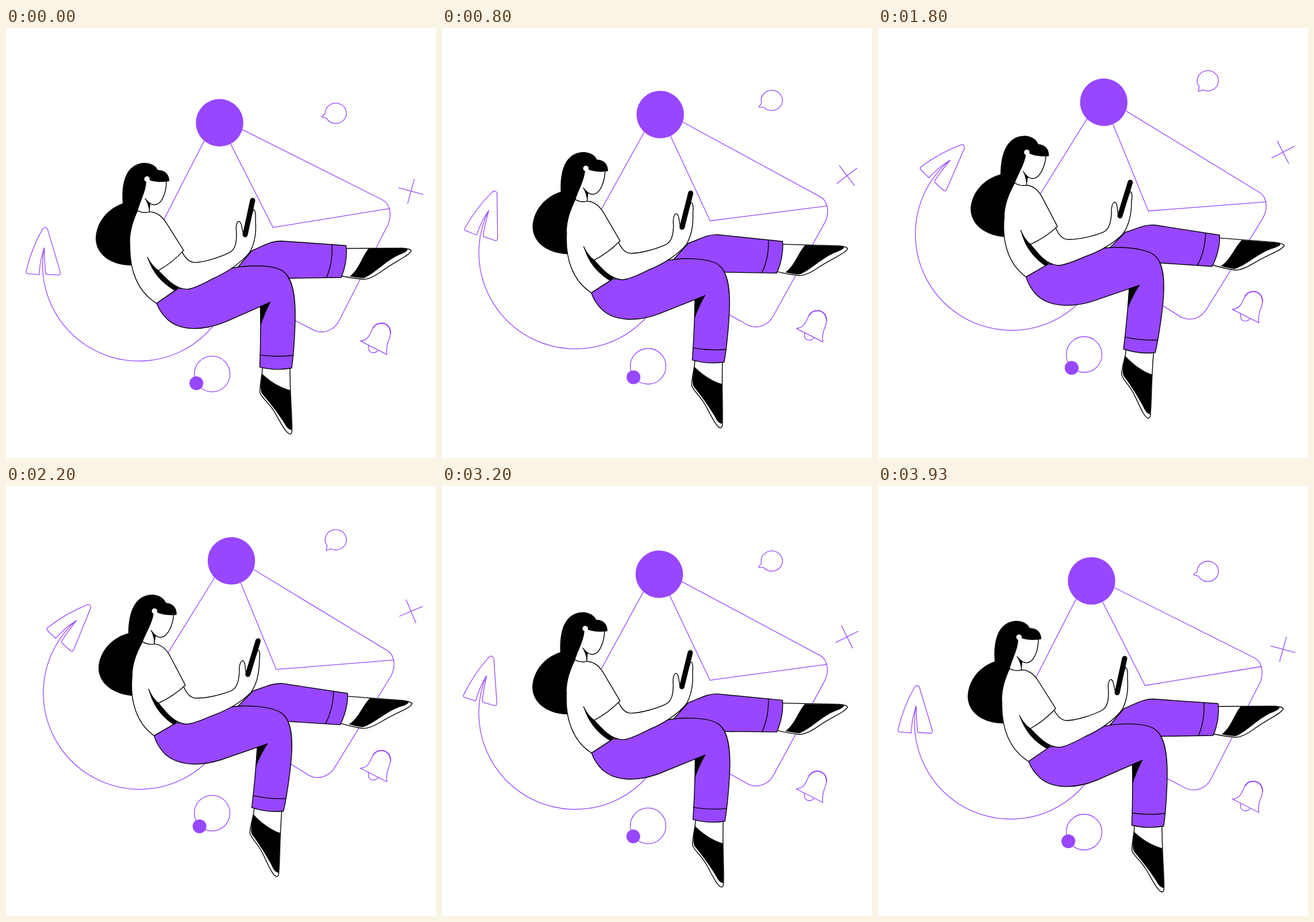
An HTML page that plays this animation: 748 px wide and 748 px high, repeating every 3.99 s.

```html
<!DOCTYPE html>
<html lang="en">
<head>
<meta charset="utf-8">
<title>Floating messenger</title>
<style>
  html, body { margin: 0; width: 100%; height: 100%; overflow: hidden; background: #fff; }
  svg { display: block; width: 100vw; height: 100vh; }
  .line { fill: none; stroke: #9747ff; stroke-width: 1.3; stroke-linejoin: round; }
  .purple { fill: #9747ff; }
  .ink { fill: none; stroke: #000; stroke-width: 1.4; stroke-linejoin: round; stroke-linecap: round; }
  .white { fill: #fff; }
  .pants { fill: #9747ff; }
</style>
</head>
<body>
<svg viewBox="0 0 748 748">
  <g class="line">
    <path id="trail"/>
    <path id="plane" d="M63.500 350Q67.500 344.500 72 350L94.500 425Q95.500 430 91 430L72 429Q69 429 68.700 426Q66.500 405 66.500 383Q59 402 57.800 429.500L38 427.800Q34 427 35 423.500C41 398 51 372 63.500 350Z"/>
    <path id="bubble"/>
    <path id="plus" d="M-22.300 0H22.300M0-22.300V22.300"/>
    <g id="bell">
      <path d="M616.500 544.500C632 543 633 531 639 521C645 512 658 511 665 519C672 529 668 538 664 548Q661 558 662.500 568Z"/>
      <path d="M638 522C645 512 658 511 665 519Q669 524 669 532" stroke-width="2"/>
      <path d="M631 552C629 560 633 565 639 565Q645 565 647.500 560"/>
    </g>
    <g id="orbit">
      <circle r="31"/>
      <circle id="moon" class="purple" r="12" stroke="none"/>
    </g>
  </g>

  <g id="scene">
    <g id="envelope">
      <path class="line" d="M371.500 144L262 358M371.500 164L464.500 347L668 314M371.500 157L655 299C668 306 672 325 664 343L580 508C572 525 554 533 537 526.500L480 497"/>
      <circle class="purple" cx="371.500" cy="165" r="41.300"/>
    </g>

    <g id="far-leg">
      <path class="ink white" d="M590 383.500L690 383Q703 384 705 387C702 396 680 404 655 422Q635 437 622 437Q605 436 582 431"/>
      <path d="M630.500 384L697 383.500Q702 387 688 393C662 403 645 425 623 435Q612 435 598 432C614 420 619 398 630.500 384Z"/>
      <path class="ink pants" d="M400 420L428 387C445 381 459 370.500 478 370.500L591.500 378.500C594 396 590 418 583 434L490 435.500Z"/>
      <path class="ink" d="M567 377C568 398 565 417 557.500 434"/>
    </g>

    <g id="near-leg">
      <path class="ink white" d="M446 590Q446 600 444 610Q441 630 442 635C446 645 457 651 467 668C477 685 486 703 493 706Q498 708 497.500 696C497.500 670 494 640 494 590"/>
      <path d="M445 601C458 613 475 625 494.500 630C495 655 497.500 680 497 699C490 699 487 692 482 684C470 666 456 648 446 637Q441 632 445 601Z"/>
      <path class="ink pants" d="M262 479L298 454L312 452L385 420C412 412 461 411 480 422C500 434 504 470 503 510C502 545 500 570 497 591.500Q470 597 441.500 590Q443.500 540 442.500 485L460 477L380 512C340 528 303 526 282 508Q268 495 262 479Z"/>
      <path d="M442.500 485L460 477Q450 496 443 518Z"/>
      <path class="ink" d="M442.500 569Q470 573 499 569.500"/>
    </g>

    <g id="body">
      <path d="M203 305C170 317 156 345 156 367C157 396 185 413 218 413L240 320Z"/>
      <path class="white" d="M229 318Q239 323 250 320C264 320 274 331 280 341L309 387L300 453L262 479C230 460 214 422 215.500 375C215.500 350 222 335 229 318Z"/>
      <path class="ink" d="M215.500 375C214 422 230 460 262 479L298 454"/>
      <path class="ink white" d="M306 389Q315 407 327 408C345 408 375 398 390 390C400 384 401 370 401 358C400 350 400 340 404 337Q408 335 410 345Q412 358 415 363L430 316Q435 316 434 335C436 360 432 376 424 390C410 408 385 425 360 436C340 447 325 454 315 454.500C295 454 280 438 265 422"/>
      <path d="M246 399Q254 415 264 421.500C275 430 285 444 301 452L293.500 457C274 446 255 428 246 399Z"/>
      <path class="ink white" d="M250 320C264 320 274 331 280 341L309 387Q290 408 265 422Q254 415 246 399"/>
      <path d="M429 300L416 359.500" stroke="#000" stroke-width="9" stroke-linecap="round"/>
    </g>

    <g id="head">
      <path class="white" d="M244 262L279 264C279 285 272 303 263 307L251 306L250 320Q239 323 229 318Z"/>
      <path class="ink" d="M279 266C279 285 272 303 263 306.500Q253 311 242 297M249.500 304V320Q239 323 229 318"/>
      <path d="M241.500 296L251 306Q250 313 249.500 319Q248 308 241.500 296Z"/>
      <path d="M203 306C200 270 208 236 241 234.500C254 235 261 241 264 247C278 247 284 256 284 266.500C270 269 255 268 246 263L244 268C243 285 234 300 229 318C222 335 215.500 350 215.500 376L203 340Z"/>
      <circle class="white" cx="245.300" cy="263" r="4.800"/>
    </g>
  </g>
</svg>
<script>
const LOOP = 3990;
const STEP = 4000 / 60;
const HALF = 2000;
const LEAD = 55;

const el = id => document.getElementById(id);
const set = (id, name, value) => el(id).setAttribute(name, value);
const polar = (cx, cy, rx, ry, deg) => {
  const a = deg * Math.PI / 180;
  return `${cx + rx * Math.cos(a)} ${cy + ry * Math.sin(a)}`;
};

// Eased rise and fall: 0 at the ends of the loop, 1 in the middle.
function lift(ms) {
  const step = Math.floor((ms + 4) / STEP);
  const t = (step * STEP + LEAD) % (2 * HALF);
  const s = 1 - Math.abs(t - HALF) / HALF;
  return s * s * (3 - 2 * s);
}

function drawTrail(p) {
  const cx = 231 + 1.5 * p, cy = 412 - 54.4 * p, turn = 40.6 * p;
  const start = polar(cx, cy, 167.5, 167.5, 25);
  const end = polar(cx, cy, 167.5, 167.5, 190 + turn);
  const large = 165 + turn > 180 ? 1 : 0;
  set("trail", "d", `M${start}A167.5 167.5 0 ${large} 1 ${end}`);
  set("plane", "transform", `translate(${1.5 * p} ${-54.4 * p}) rotate(${turn} 231 412)`);
}

function drawBubble(p) {
  const cx = 573.7, cy = 148.5 - 57.5 * p, angle = 165.4 - 36 * p;
  const at = (r, deg) => polar(cx, cy, r, r * 0.95, deg);
  set("bubble", "d",
    `M${at(18.5, angle + 14)}A18.5 17.6 0 1 1 ${at(18.5, angle - 14)}L${at(25.5, angle)}Z`);
}

function render(ms) {
  const p = lift(ms);
  set("scene", "transform", `rotate(${4.85 * p} 812 402)`);
  drawTrail(p);
  drawBubble(p);
  set("plus", "transform", `translate(704.5 ${284 - 69 * p}) rotate(${15.6 - 134.5 * p})`);
  set("bell", "transform", `translate(0 ${-56 * p})`);
  set("orbit", "transform", `translate(358.5 ${602 - 34.5 * p})`);
  set("moon", "transform", `translate(${polar(0, 0, 31.7, 31.7, 149.8 - 17 * p)})`);
}

const begin = performance.now();
function tick() {
  render((performance.now() - begin) % LOOP);
  requestAnimationFrame(tick);
}
tick();
</script>
</body>
</html>
```
